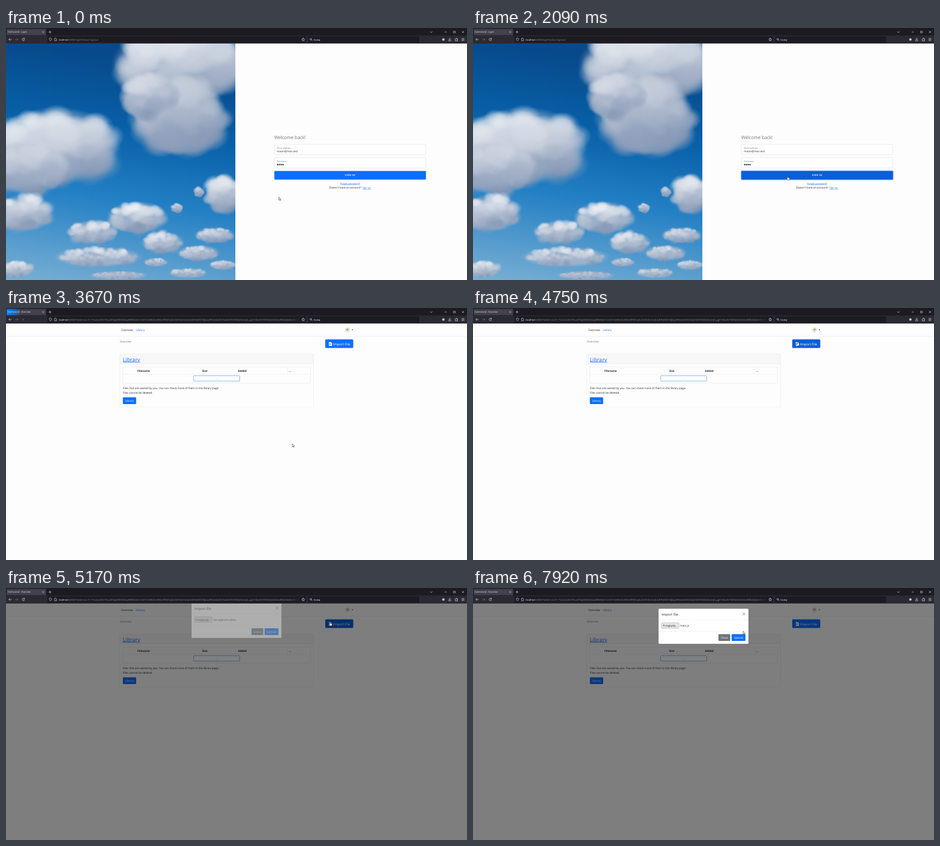
Write an HTML page with a canvas that moves like this. It is 800 by 438 pixels and loops after 8000 ms.

```html
<!DOCTYPE html>
<html lang="en">
<head>
<meta charset="utf-8">
<title>File import walkthrough</title>
<style>
html, body { margin: 0; width: 100%; height: 100%; overflow: hidden; background: #fefefe; }
canvas, svg { position: absolute; left: 0; display: block; }
canvas { top: 27px; width: 398px; height: 411px; }
svg { top: 0; width: 800px; height: 438px; }
text { font: 4.74px "Open Sans", "Noto Sans", sans-serif; fill: #212529; text-rendering: geometricPrecision; white-space: pre; }
.ui { font-size: 3.8px; fill: #fbfbfe; }
.url { font-size: 4.15px; fill: #8f8e98; }
.host { fill: #fbfbfe; }
.small { font-size: 4.16px; }
.label { font-size: 3.75px; fill: #70767c; }
.big { font-size: 5.94px; }
.bold { font-weight: 700; }
.mid { text-anchor: middle; }
.white { fill: #fff; }
.gray { fill: #6c757d; }
.link { fill: #0d6efd; }
.under { text-decoration: underline; }
.icon { fill: none; stroke: #e4e4ea; stroke-width: .65; stroke-linecap: round; stroke-linejoin: round; }
.line { fill: none; stroke: #dee2e6; stroke-width: .5; }
.blue { fill: #0d6efd; }
.ring { fill: none; stroke: #3184fd; stroke-opacity: .5; stroke-width: 1.25; }
</style>
</head>
<body>
<canvas id="sky" width="398" height="411"></canvas>
<svg viewBox="0 0 800 438">
  <defs>
    <linearGradient id="burst">
      <stop offset="0" stop-color="#0a84ff"/><stop offset=".6" stop-color="#0a70d8" stop-opacity=".85"/><stop offset="1" stop-color="#0a84ff" stop-opacity="0"/>
    </linearGradient>
    <linearGradient id="fade">
      <stop offset="0" stop-color="#1c1b22" stop-opacity="0"/><stop offset="1" stop-color="#1c1b22"/>
    </linearGradient>
    <clipPath id="urlClip"><rect x="90" y="14" width="420" height="12"/></clipPath>
  </defs>

  <g id="login">
    <rect x="398" y="27" width="402" height="411" fill="#fefdfe"/>
    <text x="465.5" y="192.6" style="font-size:8.1px;font-weight:300">Welcome back!</text>
    <g fill="#fff" stroke="#ced4da" stroke-width=".5">
      <rect x="465.8" y="202.2" width="262.8" height="17.8" rx="1.2"/>
      <rect x="465.8" y="225.4" width="262.8" height="17.8" rx="1.2"/>
    </g>
    <text class="label" x="470" y="209.5">Email address</text>
    <text x="470" y="215.8">moon@mox.test</text>
    <text class="label" x="470" y="232.6">Password</text>
    <g fill="#212529">
      <circle cx="471.4" cy="237.4" r="1.2"/><circle cx="474.5" cy="237.4" r="1.2"/>
      <circle cx="477.6" cy="237.4" r="1.2"/><circle cx="480.7" cy="237.4" r="1.2"/>
    </g>
    <rect id="signRing" class="ring" x="465.2" y="248" width="264" height="15.8" rx="1.8"/>
    <rect id="sign" class="blue" x="465.6" y="248.4" width="263.2" height="15" rx="1.4"/>
    <text class="mid bold white" x="597.2" y="257.4" style="font-size:3.9px;letter-spacing:.4px">SIGN IN</text>
    <text class="mid small link under" x="597.2" y="271.6">Forgot password?</text>
    <text x="560.6" y="279.2">Doesn't have an account?</text>
    <text class="small link under" x="618.4" y="279.2">Sign up.</text>
  </g>

  <g id="overview">
    <rect y="27" width="800" height="411" fill="#fefdfe"/>
    <path class="line" d="M0 49.2H800"/>
    <text x="200" y="40">Overview</text>
    <text class="link" x="225.5" y="40">Library</text>
    <circle cx="592.6" cy="38" r="4.6" fill="#ece7df"/>
    <circle cx="592.6" cy="37.6" r="2" fill="#c5ac84"/>
    <path d="M599.8 37.2h2.8l-1.4 1.5z" fill="#212529"/>
    <text class="gray" x="197.4" y="60.3">Overview</text>
    <rect id="importRing" class="ring" x="553.6" y="54" width="49.4" height="16" rx="2"/>
    <rect id="import" class="blue" x="554" y="54.4" width="48.6" height="15.2" rx="1.6"/>
    <path d="M560.4 59.3h3.2l2 2v4.8h-5.2z" fill="#fff"/>
    <path d="M559.4 62.8h4m-1.4-1.4l1.5 1.4l-1.5 1.4" fill="none" stroke="#0d6efd" stroke-width=".7"/>
    <text class="big white" x="567.5" y="64.7">Import File</text>

    <rect x="197.4" y="80" width="336.2" height="17" fill="#f7f7f7"/>
    <rect class="line" x="197.4" y="80" width="336.2" height="92" rx="1.2"/>
    <path class="line" d="M197.4 97H533.6"/>
    <text class="link under" x="202.8" y="92.6" style="font-size:9.2px">Library</text>
    <rect class="line" x="202.8" y="102.2" width="325.4" height="28.2"/>
    <path class="line" d="M202.8 115H528.2M488.4 102.2V115"/>
    <g class="bold">
      <text class="bold" x="228" y="110.8">Filename</text>
      <text class="bold" x="340.4" y="110.8">Size</text>
      <text class="bold" x="402.6" y="110.8">Added</text>
      <text class="bold" x="490.8" y="110.8">...</text>
    </g>
    <rect x="325.6" y="117.7" width="80" height="9.4" rx=".8" fill="#fff" stroke="#549bec" stroke-width=".7"/>
    <text class="mid gray" x="365.6" y="124" style="font-size:4px">...</text>
    <text x="202.8" y="141.2">Files that are owned by you. You can check more of them in the library page.</text>
    <text x="202.8" y="148.9">Files cannot be deleted.</text>
    <rect class="blue" x="202.8" y="155.2" width="23" height="11.8" rx="1.2"/>
    <text class="mid white" x="214.3" y="162.9">Library</text>
  </g>

  <rect id="backdrop" y="27" width="800" height="411"/>
  <g id="modal">
    <rect x="322" y="36" width="156" height="61" rx="1.5" fill="#fff"/>
    <path class="line" d="M322 55.3H478M322 75.3H478"/>
    <text class="big" x="327.2" y="48">Import file</text>
    <path d="M467.9 43l4.6 4.6m0-4.6l-4.6 4.6" fill="none" stroke="#6f6f6f" stroke-width=".8"/>
    <rect id="browse" x="327.2" y="60.6" width="30" height="9.2" rx=".8" stroke="#8f8f9d" stroke-width=".5"/>
    <text class="mid" x="342.2" y="67.3" style="font-size:4.55px">Przeglądaj…</text>
    <text id="chosen" x="359.2" y="67.4"></text>
    <rect x="426" y="80.2" width="20.4" height="11.8" rx="1.2" fill="#6c757d"/>
    <text class="mid white" x="436.2" y="88">Close</text>
    <rect class="blue" x="448.8" y="80.2" width="24" height="11.8" rx="1.2"/>
    <text class="mid white" x="460.8" y="88">Upload</text>
  </g>

  <g id="browser">
    <rect width="800" height="13.2" fill="#1c1b22"/>
    <rect y="13" width="800" height="14" fill="#2b2a33"/>
    <g id="strip">
      <rect x="1" y="1.4" width="68.6" height="11" rx="1.2" fill="#42414d"/>
      <rect id="tabBurst" x="1" y="1.4" width="24" height="11" rx="1.2" fill="url(#burst)"/>
      <text id="title" class="ui" x="3" y="8.4"></text>
      <path class="icon" d="M63.5 5.9l2.2 2.2m0-2.2l-2.2 2.2M74.4 7h4m-2-2v4"/>
      <path class="icon" d="M736.4 6.4l1.7 1.7l1.7-1.7M761.8 7h2.8M777 5.6h2.8v2.8h-2.8zM791.6 5.6l2.8 2.8m0-2.8l-2.8 2.8"/>
    </g>
    <path class="icon" d="M9.5 20H5m1.8-1.9L4.9 20l1.9 1.9"/>
    <path class="icon" d="M16 20h4.5m-1.8-1.9l1.9 1.9l-1.9 1.9" opacity=".4"/>
    <path id="reload" class="icon" d="M31.7 18.7a2.1 2.1 0 1 0 .4 1.9M32 17.5v1.6h-1.6"/>
    <path id="stop" class="icon" d="M28.4 18.4l3.2 3.2m0-3.2l-3.2 3.2" opacity=".35"/>
    <rect x="72" y="14.6" width="449" height="10.8" rx="1.2" fill="#1c1b22"/>
    <path class="icon" d="M77.2 17.7l2 .7c0 2-.5 3.2-2 4c-1.5-.8-2-2-2-4zM84.6 17.8h1.9l1.2 1.2v3.2h-3.1z"/>
    <text class="url" x="91.4" y="21.6" clip-path="url(#urlClip)"><tspan class="host">localhost</tspan><tspan id="path"></tspan></text>
    <rect x="495" y="15" width="15" height="10" fill="url(#fade)"/>
    <path class="icon" d="M515.8 17.5l.8 1.6l1.8.2l-1.3 1.3l.3 1.8l-1.6-.8l-1.6.8l.3-1.8l-1.3-1.3l1.8-.2z"/>
    <rect x="524" y="14.6" width="193" height="10.8" rx="1.2" fill="#1c1b22"/>
    <path class="icon" d="M529.9 20.6l1.4 1.5M530.2 19.5a1.4 1.4 0 1 0-2.8 0a1.4 1.4 0 1 0 2.8 0"/>
    <text class="ui" x="533.4" y="21.5" style="font-size:4px">Szukaj</text>
    <rect x="757.2" y="18.2" width="3.6" height="3.6" fill="#d0d0d8"/>
    <path class="icon" d="M770 17.5v3m-1.3-1.2l1.3 1.3l1.3-1.3M768 21.3v1h4v-1"/>
    <path class="icon" d="M780 18.8h1.3v-1h1.2v1h1.2v1.3h-1v1.1h1v1.2h-3.7z"/>
    <path class="icon" d="M791 18.2h4M791 20h4M791 21.8h4"/>
  </g>

  <g id="cursor" stroke="#111" stroke-width=".5" stroke-linejoin="round" fill="#fff">
    <path id="arrow" d="M0 0v5.2l1.2-1.1l.9 2l1-.4l-.9-2h1.7z"/>
    <path id="hand" d="M0 .5q.6-.8 1.1 0v2l2.5.7q.7.3.5 1.2l-.5 1.9h-3.1l-2-2.3q.2-.8 1.5.1z"/>
  </g>
</svg>
<script>
const LOOP = 8000, STEP = 1000 / 12;
const CLICK_SIGN = 1830, PAGE_SWAP = 3570, CLICK_IMPORT = 4960, DIALOG = [6080, 7560];
const $ = id => document.getElementById(id);
const set = (id, attrs) => { for (const k in attrs) $(id).setAttribute(k, attrs[k]); };
const show = (id, on) => { $(id).style.display = on ? "" : "none"; };
const between = (t, a, b) => t >= a && t < b;
const clamp = v => Math.max(0, Math.min(1, v));

function seeded(s) {
  return () => (s = (s * 16807) % 2147483647) / 2147483647;
}

function drawSky() {
  const c = $("sky").getContext("2d"), rnd = seeded(77);
  const bg = c.createLinearGradient(60, 0, 0, 411);
  [[0, "#07498a"], [.3, "#0860a8"], [.6, "#2480c4"], [.85, "#5a9ece"], [1, "#78afd3"]]
    .forEach(([o, col]) => bg.addColorStop(o, col));
  c.fillStyle = bg;
  c.fillRect(0, 0, 398, 411);

  const puff = (x, y, rx, ry, rgb, alpha, core) => {
    c.save();
    c.translate(x, y);
    c.scale(rx, ry);
    const g = c.createRadialGradient(0, 0, 0, 0, 0, 1);
    g.addColorStop(0, `rgba(${rgb},${alpha})`);
    g.addColorStop(core, `rgba(${rgb},${alpha * .85})`);
    g.addColorStop(1, `rgba(${rgb},0)`);
    c.fillStyle = g;
    c.fillRect(-1, -1, 2, 2);
    c.restore();
  };
  const cloud = ([x, y, rx, ry, lit]) => {
    puff(x, y, rx, ry, "168,182,203", .95, .7);
    const n = 30 + rx * .6;
    for (let i = 0; i < n; i++) {
      const a = rnd() * Math.PI * 2, d = Math.sqrt(rnd()) * .84;
      const v = Math.sin(a) * d, r = ry * (.2 + rnd() * .25);
      const k = clamp(.5 - v * .75 - Math.cos(a) * d * .15 + rnd() * .15) * lit;
      const rgb = [132 + k * 106, 150 + k * 90, 180 + k * 64].map(Math.round).join();
      puff(x + Math.cos(a) * d * rx, y + v * ry, r * 1.25, r, rgb, .6, .45);
    }
  };
  // x, y, rx, ry, brightness
  [[300, 38, 118, 68, .9], [305, 128, 80, 66, .6], [250, 92, 55, 42, .75],
   [88, 178, 112, 68, .95], [42, 218, 66, 46, .7],
   [34, 294, 50, 33, .9], [228, 302, 54, 28, 1], [150, 328, 46, 21, .9],
   [160, 371, 78, 18, .95], [272, 346, 38, 19, .9], [334, 364, 38, 14, .9],
   [362, 333, 36, 14, .85], [378, 262, 32, 34, .9], [297, 286, 10, 9, .7],
   [335, 258, 9, 9, .6], [18, 392, 32, 15, .9], [260, 380, 22, 8, .8],
   [376, 385, 24, 9, .8], [316, 399, 34, 9, .75], [195, 403, 52, 8, .65]]
    .forEach(cloud);
}

function makeToken() {
  const abc = "abcdefghijklmnopqrstuvwxyzABCDEFGHIJKLMNOPQRSTUVWXYZ0123456789-_", rnd = seeded(41);
  return Array.from({ length: 200 }, () => abc[Math.floor(rnd() * abc.length)]).join("");
}
const tokenPath = ":3000/?token=" + makeToken();

// time, x, y
const TRACK = [
  [0, 473.4, 294], [1000, 473.4, 294], [1660, 545.4, 257.6], [2700, 545.4, 257.6],
  [3500, 496.8, 236], [3800, 496.8, 236], [4600, 562.3, 59.2], [5150, 562.3, 59.2],
  [5750, 346.4, 64.4], [6080, 346.4, 64.4], [6740, 401, 70.5], [6920, 96, 161],
  [7490, 410, 84], [7840, 468.6, 75.2], [8000, 468.6, 75.2]];

function pointer(t) {
  const i = Math.max(1, TRACK.findIndex(k => k[0] > t));
  const [t0, x0, y0] = TRACK[i - 1], [t1, x1, y1] = TRACK[i];
  const p = clamp((t - t0) / (t1 - t0)), e = p * p * (3 - 2 * p);
  return [x0 + (x1 - x0) * e, y0 + (y1 - y0) * e];
}

function setText(id, s) {
  if ($(id).textContent !== s) $(id).textContent = s;
}

function render(time) {
  const t = Math.floor((time + 6) / STEP) * STEP;
  const home = t >= PAGE_SWAP, [x, y] = pointer(t);
  const inside = (l, top, r, b) => x > l && x < r && y > top && y < b;

  show("sky", !home);
  show("login", !home);
  show("overview", home);
  setText("title", "Dulmorand - " + (home ? "Overview" : "Login"));
  setText("path", home ? tokenPath : ":3000/login?status=signout");

  const loading = between(t, 3400, 3800);
  show("stop", loading);
  show("reload", !loading);
  show("tabBurst", between(t, PAGE_SWAP, 3900));
  $("tabBurst").style.opacity = 1 - clamp((t - 3700) / 200);

  const overSign = !home && inside(465, 248, 729, 264);
  const signed = t >= CLICK_SIGN;
  $("sign").style.fill = overSign || signed ? "#0b5ed7" : "";
  show("signRing", signed);

  const overImport = home && t < 5200 && inside(554, 54, 603, 70);
  const importFocus = between(t, CLICK_IMPORT - 90, 5110);
  $("import").style.fill = overImport || importFocus ? "#0b5ed7" : "";
  show("importRing", importFocus);

  $("backdrop").style.opacity = .5 * clamp((t - CLICK_IMPORT) / 150);
  const since = t - CLICK_IMPORT - 150, slide = 1 - clamp(since / 300);
  show("modal", since > 0);
  $("modal").style.opacity = clamp(since / 150);
  set("modal", { transform: `translate(0 ${-15.6 * slide * slide})` });

  const overBrowse = since > 0 && t < DIALOG[0] && inside(327, 60, 358, 70);
  $("browse").style.fill = between(t, 5820, 5980) ? "#b1b1b9" : overBrowse ? "#d0d0d7" : "#e9e9ed";
  setText("chosen", t < DIALOG[1] ? "Nie wybrano pliku." : "main.js");
  $("strip").style.opacity = between(t, ...DIALOG) ? .65 : 1;

  const hand = overSign || overImport;
  show("hand", hand);
  show("arrow", !hand);
  show("cursor", !between(t, 6990, 7490));
  set("cursor", { transform: `translate(${x} ${y})` });
}

drawSky();
const start = performance.now();
(function frame() {
  render((performance.now() - start) % LOOP);
  requestAnimationFrame(frame);
})();
</script>
</body>
</html>
```
